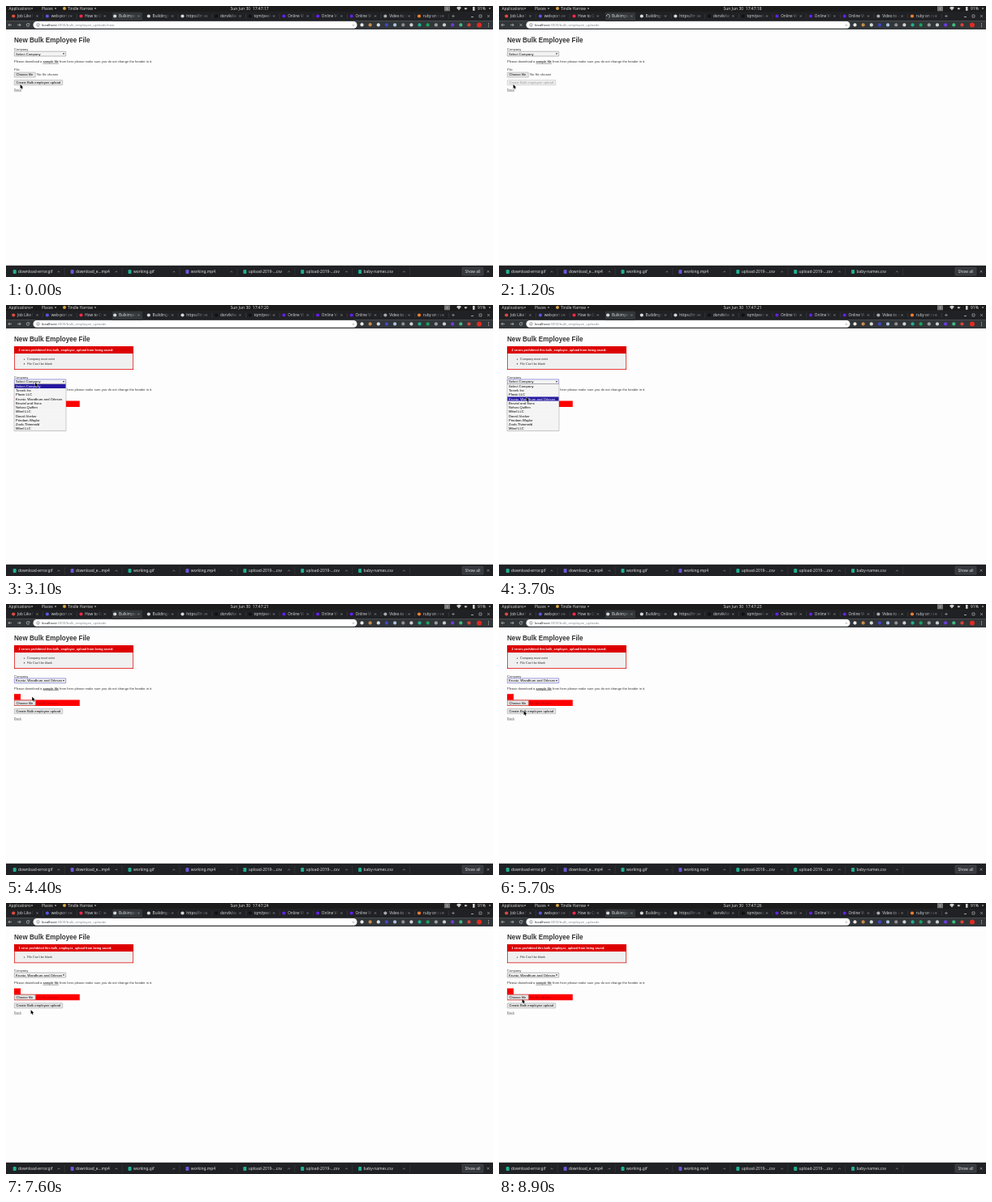
These frames come from a looping animation (600 by 335 pixels, 9000 ms). An HTML page with a canvas:

```html
<!DOCTYPE html>
<html lang="en">
<head>
<meta charset="utf-8">
<title>Bulk upload form</title>
<style>
html, body { margin: 0; width: 100%; height: 100%; overflow: hidden; background: #fff; }
canvas { display: block; width: 600px; height: 335px; }
</style>
</head>
<body>
<canvas id="stage"></canvas>
<script>
const LOOP = 9000, UNIT = 0.3125; // one screen pixel on the stage
const PAGE = '"Liberation Sans", Arial, sans-serif';
const UI = '"Noto Sans", "Open Sans", sans-serif';
const canvas = document.getElementById('stage');
const ctx = canvas.getContext('2d');
const dpr = window.devicePixelRatio || 1;
canvas.width = 600 * dpr;
canvas.height = 335 * dpr;

const companies = ['Select Company', 'Torvek Inc', 'Plavin LLC', 'Kruntz, Wandhurn and Orlesen',
  'Brovtel and Sons', 'Nelvar-Quiffen', 'Mibel LLC', 'Dassil-Voeker', 'Prindam-Waylor',
  'Zoob-Thimmald', 'Mibel LLC'];
const tabs = [['Job Like !', '#e04a3f'], ['web-portal', '#5a55e0'], ['How to Cr', '#f0284a'],
  ['Bulkimport', '#d8d8d8'], ['Building r', '#d8d8d8'], ['https://ma', '#d8d8d8'],
  ['dorvik/se', '#111'], ['tqm/peek', '#111'], ['Online Vi', '#6420e8'], ['Online Vi', '#6420e8'],
  ['Online Vi', '#6420e8'], ['Video to a', '#aaa'], ['ruby on ra', '#ee7f2d']];
const downloads = ['download-error.gif', 'download_e...mp4', 'working.gif', 'working.mp4',
  'upload-2019-...csv', 'upload-2019-...csv', 'baby-names.csv'];
const extensions = ['#e8e8e8', '#c98a4b', '#d5d8dc', '#3f48c8', '#a9c4e0', '#8f8f94', '#d0d0d0',
  '#1fb08a', '#18a45c', '#9a9da0', '#c9ccd0', '#6b3be0', '#41b883', '#d9423a'];

// time, x, y of the pointer tip
const route = [[0, 17.6, 96.9], [1750, 17.6, 96.9], [2300, 35.6, 99.3], [2600, 36, 95.9],
  [3250, 36, 95.9], [3750, 33.6, 114.6], [4000, 32.6, 114.8], [4600, 32, 114.8],
  [5700, 30.6, 132.3], [7600, 30.6, 132.3], [8600, 28.6, 118.8], [LOOP, 28.6, 118.8]];

function rect(x, y, w, h, fill, stroke, r = 0) {
  ctx.beginPath();
  ctx.roundRect(x, y, w, h, r);
  if (fill) { ctx.fillStyle = fill; ctx.fill(); }
  if (stroke) { ctx.strokeStyle = stroke; ctx.lineWidth = 0.5; ctx.stroke(); }
}

function dot(x, y, r, color) {
  ctx.beginPath();
  ctx.arc(x, y, r, 0, 7);
  ctx.fillStyle = color;
  ctx.fill();
}

function arc(x, y, r, from, to, color, width = 0.6) {
  ctx.beginPath();
  ctx.arc(x, y, r, from, to);
  ctx.strokeStyle = color;
  ctx.lineWidth = width;
  ctx.stroke();
}

function line(points, color, width = 0.5) {
  ctx.beginPath();
  points.forEach(([x, y]) => ctx.lineTo(x, y));
  ctx.strokeStyle = color;
  ctx.lineWidth = width;
  ctx.stroke();
}

function cross(x, y, r, color) {
  line([[x - r, y - r], [x + r, y + r]], color);
  line([[x - r, y + r], [x + r, y - r]], color);
}

function caret(x, y, color, r = 1.2) {
  ctx.beginPath();
  ctx.moveTo(x - r, y - r / 2);
  ctx.lineTo(x + r, y - r / 2);
  ctx.lineTo(x, y + r);
  ctx.fillStyle = color;
  ctx.fill();
}

// Writes s with its middle at height y and returns the width on the stage.
function text(s, x, y, color, { size = 13, font = PAGE, weight = '', align = 'left', underline } = {}) {
  ctx.save();
  ctx.translate(x, y + size * UNIT * 0.35);
  ctx.scale(UNIT, UNIT);
  ctx.font = `${weight} ${size}px ${font}`;
  ctx.textAlign = align;
  ctx.fillStyle = color;
  ctx.fillText(s, 0, 0);
  const width = ctx.measureText(s).width;
  if (underline) ctx.fillRect(0, 1.4, width, 1.2);
  ctx.restore();
  return width * UNIT;
}

const ui = (s, x, y, color, size = 15, align) => text(s, x, y, color, { size, font: UI, align });

function button(label, x, y, w, disabled) {
  rect(x + 0.25, y - 3, w, 6.1, disabled ? '#eee' : '#e6e6e6', disabled ? '#bbb' : '#999', 0.3);
  text(label, x + 2.4, y, disabled ? '#999' : '#000', { size: 13.33 });
}

function topBar(t) {
  rect(0, 0, 600, 7, '#1b1b1b');
  ui('Applications', 3.5, 3, '#ddd');
  caret(32, 3, '#ccc');
  ui('Places', 44, 3, '#ddd');
  caret(61, 3, '#ccc');
  dot(72, 3, 2, '#d9a441');
  ui('Tindle Harrow', 76, 3, '#ddd');
  caret(110, 3, '#ccc');
  ui('Sun Jun 30  17:47:' + (17 + Math.floor(t / 1000 + 0.3)), 300, 3, '#ddd', 16, 'center');
  rect(540, 0.3, 7, 6, '#777');
  ui('1', 543.5, 3.2, '#ddd', 13, 'center');
  ctx.beginPath();
  ctx.moveTo(558, 5.5);
  ctx.arc(558, 5.5, 4.5, -2.3, -0.85);
  ctx.fillStyle = '#ccc';
  ctx.fill();
  rect(565, 2.2, 1.5, 2, '#ccc');
  caret(567, 3.2, '#ccc', 1.5);
  rect(575, 1, 2.6, 4.8, '#ccc');
  ui('91%', 581, 3, '#ddd', 16);
  caret(596, 3, '#ccc');
}

function tabStrip(t, loading) {
  rect(0, 7, 600, 11.5, '#202124');
  rect(131, 7.8, 37, 12, '#323639', null, 1.5);
  tabs.forEach(([title, color], i) => {
    const x = 5 + i * 41.65, active = i === 3;
    const back = active ? '50,54,57' : '32,33,36';
    if (active && loading) arc(x + 4.5, 12.5, 2.1, t / 130, t / 130 + 4.6, '#ccc', 0.7);
    else dot(x + 4.2, 12.5, 2.1, color);
    if (active && t > 5000 && loading) title = 'localhost:3';
    ctx.save();
    ctx.beginPath();
    ctx.rect(x + 8, 8, 23, 10);
    ctx.clip();
    ui(title, x + 9, 12.5, '#d5d7da');
    const fade = ctx.createLinearGradient(x + 22, 0, x + 31, 0);
    fade.addColorStop(0, `rgba(${back},0)`);
    fade.addColorStop(1, `rgb(${back})`);
    rect(x + 22, 8, 9, 10, fade);
    ctx.restore();
    cross(x + 33.5, 12.5, 1.1, '#bbb');
    if (i !== 2 && !active) line([[x + 40.5, 9.7], [x + 40.5, 15.5]], '#55585c', 0.4);
  });
  line([[549.2, 12.5], [552.8, 12.5]], '#ccc');
  line([[551, 10.7], [551, 14.3]], '#ccc');
  line([[573, 13.5], [576, 13.5]], '#ddd', 0.7);
  rect(583, 11, 3, 3, null, '#ddd');
  cross(594.5, 12.5, 1.4, '#ddd');
}

function toolBar(t, loading) {
  rect(0, 18.2, 600, 10.8, '#323639');
  rect(33.5, 19.1, 399, 8.6, '#fff', null, 4.3);
  for (const [x, d] of [[5, -1], [16, 1]]) {
    line([[x - 2, 23.4], [x + 2, 23.4]], '#ddd', 0.6);
    line([[x + d * 0.3, 21.6], [x + d * 2, 23.4], [x + d * 0.3, 25.2]], '#ddd', 0.6);
  }
  if (loading) cross(27, 23.4, 1.6, '#ddd');
  else {
    arc(27, 23.4, 1.8, 0.3, 5.5, '#ddd');
    line([[28.9, 21.2], [28.9, 23], [27.2, 23]], '#ddd');
  }
  arc(39.5, 23.4, 1.8, 0, 7, '#555', 0.5);
  line([[39.5, 23.1], [39.5, 24.5]], '#555');
  const w = ui('localhost', 44, 23.3, '#222', 13.8);
  ui(':3000/bulk_employee_uploads' + (t < 1100 ? '/new' : ''), 44 + w, 23.3, '#80868b', 13.8);
  ui('☆', 428, 23.2, '#444', 14, 'center');
  extensions.forEach((c, i) => dot(438.5 + i * 10.15, 23.4, 2.1, c));
  dot(583, 23.4, 3, '#e02b20');
  for (const y of [21.5, 23.4, 25.3]) dot(594.5, y, 0.5, '#ddd');
}

function shelf() {
  rect(0, 321, 600, 14, '#202124');
  rect(0, 320.7, 600, 0.4, '#444');
  downloads.forEach((name, i) => {
    const x = 8.7 + i * 70.9;
    rect(x, 326, 4, 5, name.endsWith('mp4') ? '#6d55d8' : '#1fb092', null, 1);
    ui(name, x + 6.4, 328.6, '#ddd', 15.6);
    line([[x + 54.9, 329.2], [x + 56.3, 327.8], [x + 57.7, 329.2]], '#ccc');
    line([[x + 63.5, 324], [x + 63.5, 333]], '#4a4c50', 0.4);
  });
  rect(562, 323.2, 26, 9.8, '#35383c', '#55585c', 1);
  ui('Show all', 575, 328.2, '#ddd', 15.6, 'center');
  cross(594, 328.2, 1.4, '#ccc');
}

function errorBox(messages) {
  const h = 17.6 + messages.length * 5.7;
  rect(10, 51, 147, h, '#d00');
  rect(10.7, 60, 145.6, h - 9.7, '#f0f0f0');
  const title = messages.length > 1 ? '2 errors' : '1 error';
  text(title + ' prohibited this bulk_employee_upload from being saved:', 15.5, 55.7, '#fff',
    { size: 12, weight: 'bold' });
  messages.forEach((m, i) => {
    const y = 67 + i * 5.6;
    dot(22.5, y + 0.1, 0.7, '#333');
    text(m, 26, y, '#333', { size: 12 });
  });
}

function form(t, errors, loading) {
  const shift = [0, 30, 35.7][errors]; // room taken by the error box
  const chosen = t >= 4000, failed = errors > 0;
  text('New Bulk Employee File', 10, 42.6, '#333', { size: 26, weight: 'bold' });
  if (failed) errorBox(['Company must exist', "File Can't be blank"].slice(-errors));

  text('Company', 10, 53.4 + shift, '#333');
  const focused = t >= 2800 && t < 6500;
  rect(10.3, 56.2 + shift, 63.4, 5.8, '#f3f3f3', focused ? '#3c3cc0' : '#777', 0.3);
  text(companies[chosen ? 3 : 0], 12, 59.1 + shift, '#000', { size: 13.33 });
  caret(71, 59 + shift, '#000', 1.1);

  const y = 69 + shift;
  let x = 10 + text('Please download a ', 10, y, '#333');
  x += text('sample file', x, y, '#000', { underline: true });
  text(' from here please make sure you do not change the header in it.', x, y, '#333');

  const fileY = 85 + shift + (failed ? 1.5 : 0);
  if (failed) {
    rect(10, fileY - 11, 8, 7.5, '#f00');
    rect(10, fileY - 3.8, 80.8, 7.5, '#f00');
  }
  text('File', 10.2, 78.6 + shift + (failed ? 0.9 : 0), failed ? '#d80000' : '#333');
  button('Choose file', 10, fileY, 26, false);
  text('No file chosen', 38, fileY, failed ? '#b00000' : '#333', { size: 13.33 });

  const drop = shift + (failed ? 2.2 : 0);
  button('Create Bulk employee upload', 10, 94.6 + drop, 59.5, loading);
  text('Back', 10, 103.6 + drop, '#666', { underline: true });
}

function menu(pointerY) {
  const top = 97.9, row = 5.22;
  const hover = Math.max(0, Math.floor((pointerY - top) / row));
  rect(10.2, top - 0.3, 63.6, 58, '#fff', '#666');
  companies.forEach((name, i) => {
    const y = top + i * row;
    rect(10.5, y, 63, row, i === hover ? '#2418a0' : '#f4f4f4');
    text(name, 12, y + row / 2, i === hover ? '#fff' : '#000', { size: 13.33 });
  });
}

function pointerAt(t) {
  const i = route.findIndex(p => p[0] > t);
  const [t0, x0, y0] = route[i - 1], [t1, x1, y1] = route[i];
  const u = (t - t0) / (t1 - t0), k = u * u * (3 - 2 * u);
  return [x0 + (x1 - x0) * k, y0 + (y1 - y0) * k];
}

function pointer(x, y) {
  ctx.beginPath();
  for (const [dx, dy] of [[0, 0], [0, 5], [1.2, 4], [2, 5.8], [2.9, 5.4], [2.1, 3.6], [3.6, 3.5]])
    ctx.lineTo(x + dx, y + dy);
  ctx.closePath();
  ctx.strokeStyle = '#fff';
  ctx.lineWidth = 0.6;
  ctx.stroke();
  ctx.fillStyle = '#000';
  ctx.fill();
}

function draw(now) {
  const t = now % LOOP;
  const loading = (t >= 1100 && t < 1800) || (t >= 6500 && t < 7400);
  const errors = t < 1800 ? 0 : t < 7400 ? 2 : 1;
  const [x, y] = pointerAt(t);
  ctx.setTransform(dpr, 0, 0, dpr, 0, 0);
  rect(0, 0, 600, 335, '#fdfdfd');
  topBar(t);
  tabStrip(t, loading);
  toolBar(t, loading);
  form(t, errors, loading);
  if (t >= 2800 && t < 4000) menu(y);
  shelf();
  pointer(x, y);
}

const start = performance.now();
(function tick() {
  draw(performance.now() - start);
  requestAnimationFrame(tick);
})();
</script>
</body>
</html>
```
